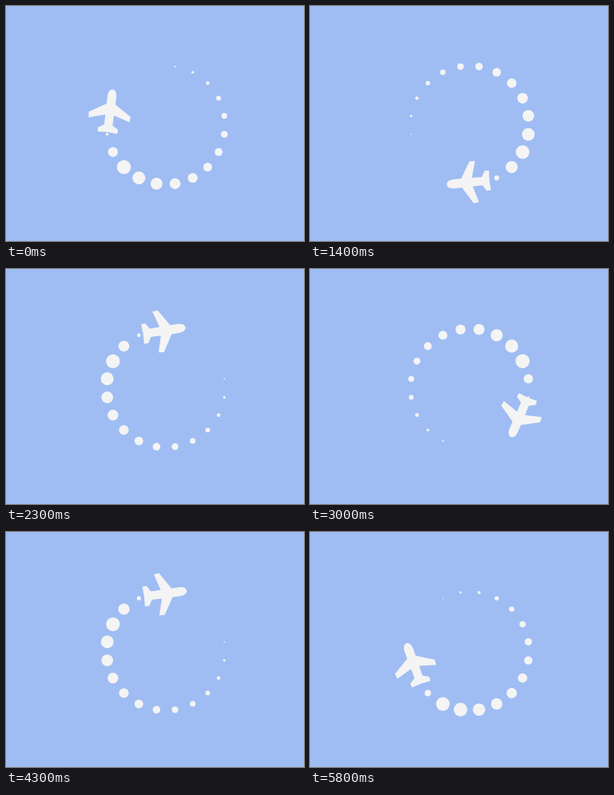
Recreate the animation shown at these times as an HTML page. Size 373 by 294 pixels, loop 5.9 s.

```html
<!DOCTYPE html>
<html lang="en">
<head>
<meta charset="utf-8">
<title>Plane loader</title>
<style>
  html, body { margin: 0; width: 100%; height: 100%; overflow: hidden; background: #9fbdf3; }
  svg { display: block; width: 100%; height: 100%; fill: #f4f4f4; }
</style>
</head>
<body>
<svg viewBox="0 0 373 294">
  <g transform="translate(200 149)">
    <g id="dots"></g>
    <g id="plane">
      <path transform="translate(0 -71.3)" d="M36 0C36 3 33 5.6 27 5.6L17.5 5.6 4.8 26.4 -2 25.8 4 5.4 -8.5 5.2 -13 12.6 -18.3 12.3 -17.6 0 -18.3 -12.3 -13 -12.6 -8.5 -5.2 4 -5.4 -2 -25.8 4.8 -26.4 17.5 -5.6 27 -5.6C33 -5.6 36 -3 36 0Z"/>
    </g>
  </g>
</svg>
<script>
  const LOOP = 5900, TICK = 100, COUNT = 20, RING = 74.2, PEAK = 9;
  const holds = [12, 24, 35, 46, 57];   // ticks on which the picture stays still
  // heading in degrees at a few steps, linear in between
  const knots = [[0, 277], [5, 377.2], [13, 534.3], [22, 711.2], [34, 955], [45, 1170], [53, 1330.2]];
  const NS = 'http://www.w3.org/2000/svg';
  const plane = document.getElementById('plane');
  const layer = document.getElementById('dots');

  const dots = Array.from({ length: COUNT }, (_, i) => {
    const angle = (i + 0.5) * 360 / COUNT, a = angle * Math.PI / 180;
    const el = document.createElementNS(NS, 'circle');
    el.setAttribute('cx', RING * Math.sin(a));
    el.setAttribute('cy', -RING * Math.cos(a));
    layer.append(el);
    return { el, angle };
  });

  function heading(step) {
    const i = Math.max(1, knots.findIndex(k => k[0] >= step));
    const [s0, a0] = knots[i - 1], [s1, a1] = knots[i];
    return a0 + (a1 - a0) * (step - s0) / (s1 - s0);
  }

  // quick growth behind the tail, then a long linear fade to nothing
  function radius(lag) {
    if (lag < 9 || lag > 297) return 0;
    return PEAK * (lag < 45 ? (lag - 9) / 36 : (297 - lag) / 252);
  }

  function draw(now) {
    const tick = Math.floor((now % LOOP) / TICK);
    const rot = heading(tick - holds.filter(h => h <= tick).length);
    plane.setAttribute('transform', `rotate(${rot})`);
    for (const { el, angle } of dots) {
      el.setAttribute('r', radius((rot - angle + 360) % 360));
    }
  }

  const start = performance.now();
  function frame() {
    draw(performance.now() - start);
    requestAnimationFrame(frame);
  }
  frame();
</script>
</body>
</html>
```
